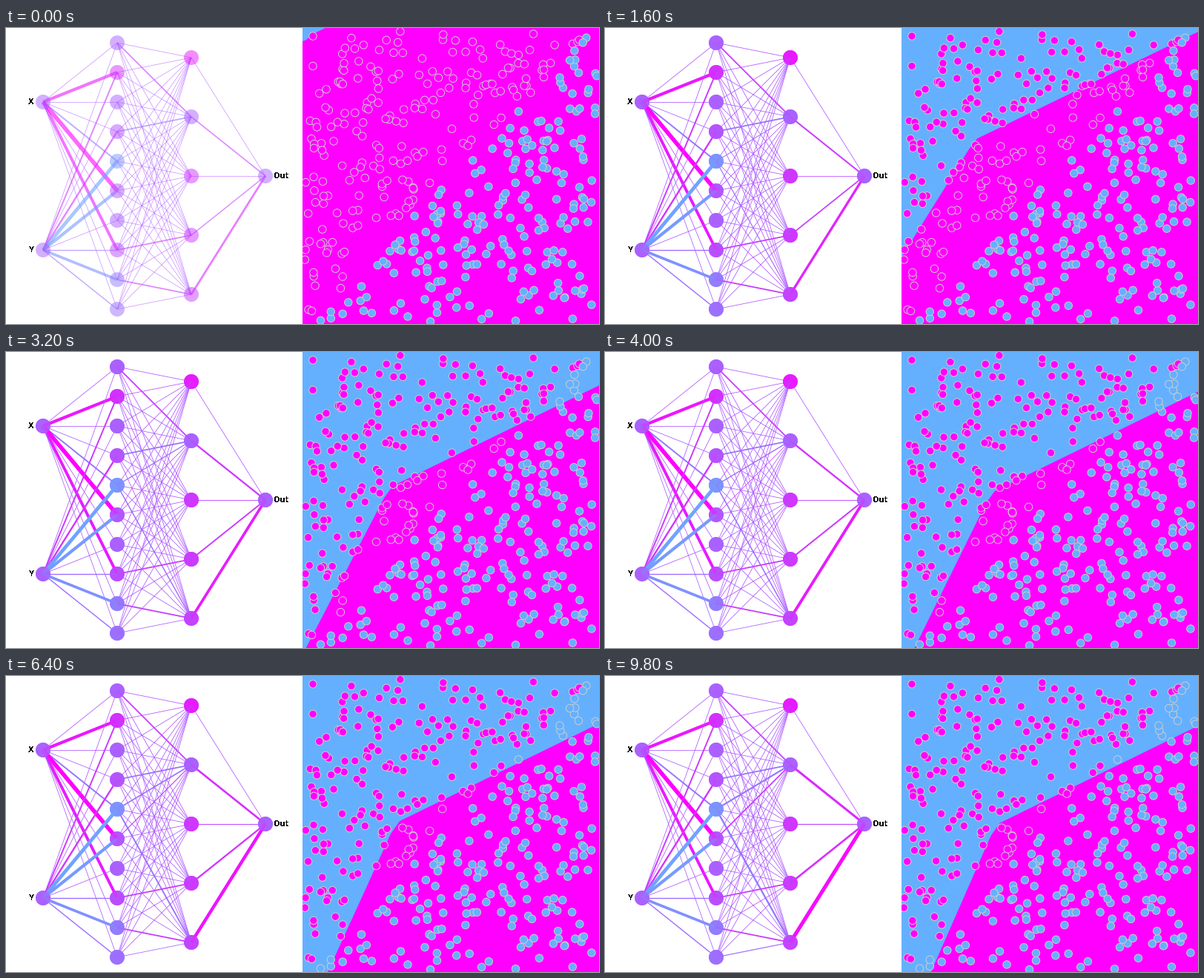
Recreate the animation shown at these times as a matplotlib script. Size 800x400 px, loop 10000 ms.

```python
import numpy as np
import matplotlib.pyplot as plt
from matplotlib.animation import FuncAnimation
from matplotlib.collections import EllipseCollection, LineCollection
from matplotlib.patches import Polygon, Rectangle

FRAMES, STEP = 50, 200
DPI = 100
PX = 72 / DPI
SAMPLES = 410
BLUE = np.array([100, 176, 255]) / 255
PINK = np.array([255, 0, 255]) / 255
GREY = (0.8, 0.8, 0.8)

plt.rcParams["text.antialiased"] = False
rng = np.random.default_rng(7)


def mix(v):
    """Blue for -1, magenta for +1."""
    t = (np.clip(v, -1, 1)[:, None] + 1) / 2
    return BLUE + (PINK - BLUE) * t


def rgba(rgb, alpha):
    return np.column_stack([rgb, np.full(len(rgb), alpha)])


# ---- network
layers = [
    [(50, 100), (50, 300)],
    [(150, 20 + 40 * i) for i in range(10)],
    [(250, 40 + 80 * i) for i in range(5)],
    [(350, 200)],
]
nodes = np.array([p for layer in layers for p in layer], float)
segments = [(a, b) for left, right in zip(layers, layers[1:])
            for a in left for b in right]

# weights at the start, and how much training adds to them
first = np.array([
    [0, 0.75, 0, -0.1, -0.35, 1, 0, 0.7, 0, -0.1],
    [0, 0.35, 0, 0.42, -0.85, -0.75, 0, -0.25, -0.65, -0.25],
])
middle = rng.uniform(-0.15, 0.1, (10, 5))
middle[[0, 7, 8], [1, 3, 4]] = 0.32
middle[3, 1] = -0.32
last = np.array([0, 0.3, 0.12, 0.26, 0.5])

gain = np.zeros((10, 5))
gain[[4, 4, 9], [1, 4, 4]] = -0.28
gain[5, 1] = 0.35
w_start = np.concatenate([first.ravel(), middle.ravel(), last])
w_gain = np.concatenate([first.ravel() * 0, gain.ravel(), last * 0.8])

# a node takes its tint from the weights that enter it
tint = np.concatenate([[0, 0], first.mean(axis=0),
                       [0.8, 0, 0.5, 0.45, 0.35], [0]]) - 0.1


# ---- decision border
def ease(k, start, end, share, tau):
    """Fast drop for one share of the way, slow settling for the rest."""
    rest = share * np.exp(-k / 3.2) + (1 - share) * np.exp(-k / tau)
    return end + (start - end) * rest


def blue_area(k):
    left = ease(k, 18, 495, 0.235, 11)
    right = ease(k, -174, 68, 0.46, 9)
    low = [ease(k, a, b, 0.46, 9) for a, b in ((405, 521), (16, 216))]
    high = [ease(k, a, b, 0.46, 9) for a, b in ((414, 533), (8, 199))]
    top = min(right, 0) - 1
    return [(400, left), low, high, (800, right), (800, top), (400, top)]


# ---- samples, split by a diagonal
points = rng.uniform((402, 3), (798, 397), (SAMPLES, 2))
is_blue = points[:, 0] + 0.968 * points[:, 1] > 793
fills = np.where(is_blue[:, None], BLUE, PINK)

# ---- stage
fig = plt.figure(figsize=(8, 4), dpi=DPI, facecolor="white")
ax = fig.add_axes([0, 0, 1, 1])
ax.set_xlim(0, 800)
ax.set_ylim(400, 0)
ax.axis("off")


def discs(xy, size, z, **style):
    n = len(xy)
    return ax.add_collection(EllipseCollection(
        [size] * n, [size] * n, [0] * n, units="xy", offsets=xy,
        offset_transform=ax.transData, zorder=z, **style))


panel = Rectangle((400, 0), 400, 400, fc=PINK, ec="none", zorder=0)
ax.add_patch(panel)
area = Polygon(blue_area(0), closed=True, fc=BLUE, ec="none", zorder=1)
ax.add_patch(area)
area.set_clip_path(panel)
dots = discs(points, 10.4, 2, facecolors=fills, edgecolors=GREY,
             linewidths=PX)
dots.set_clip_path(panel)

under = discs(nodes, 20, 3, edgecolors="none")
links = LineCollection(segments, zorder=4)
ax.add_collection(links)
over = discs(nodes, 20, 5, edgecolors="none")

for x, y, word, align in ((38, 103, "X", "right"), (38, 303, "Y", "right"),
                          (362, 203, "Out", "left")):
    ax.text(x, y, word, ha=align, va="baseline", family="DejaVu Sans",
            weight="bold", size=10 * PX, color="black", zorder=6)


def draw(k):
    # half-transparent paint builds up layer on layer
    left = 0.5 ** (k + 1)
    top = 2 / 3 * (1 - 0.25 ** (k + 1))

    w = w_start + w_gain * (k / (FRAMES - 1)) ** 0.8
    links.set_linewidths(np.maximum(0.8, 5.6 * np.abs(w)) * PX)
    links.set_color(rgba(mix(w), 1 - 0.4 ** (k + 1)))

    under.set_facecolor(rgba(mix(tint), max(0, 1 - left / (1 - top))))
    over.set_facecolor(rgba(mix(tint), top))

    area.set_xy(blue_area(k))
    return area, links, under, over


anim = FuncAnimation(fig, draw, frames=FRAMES, interval=STEP,
                     init_func=lambda: draw(0), repeat=True, repeat_delay=0)
plt.show()
```
